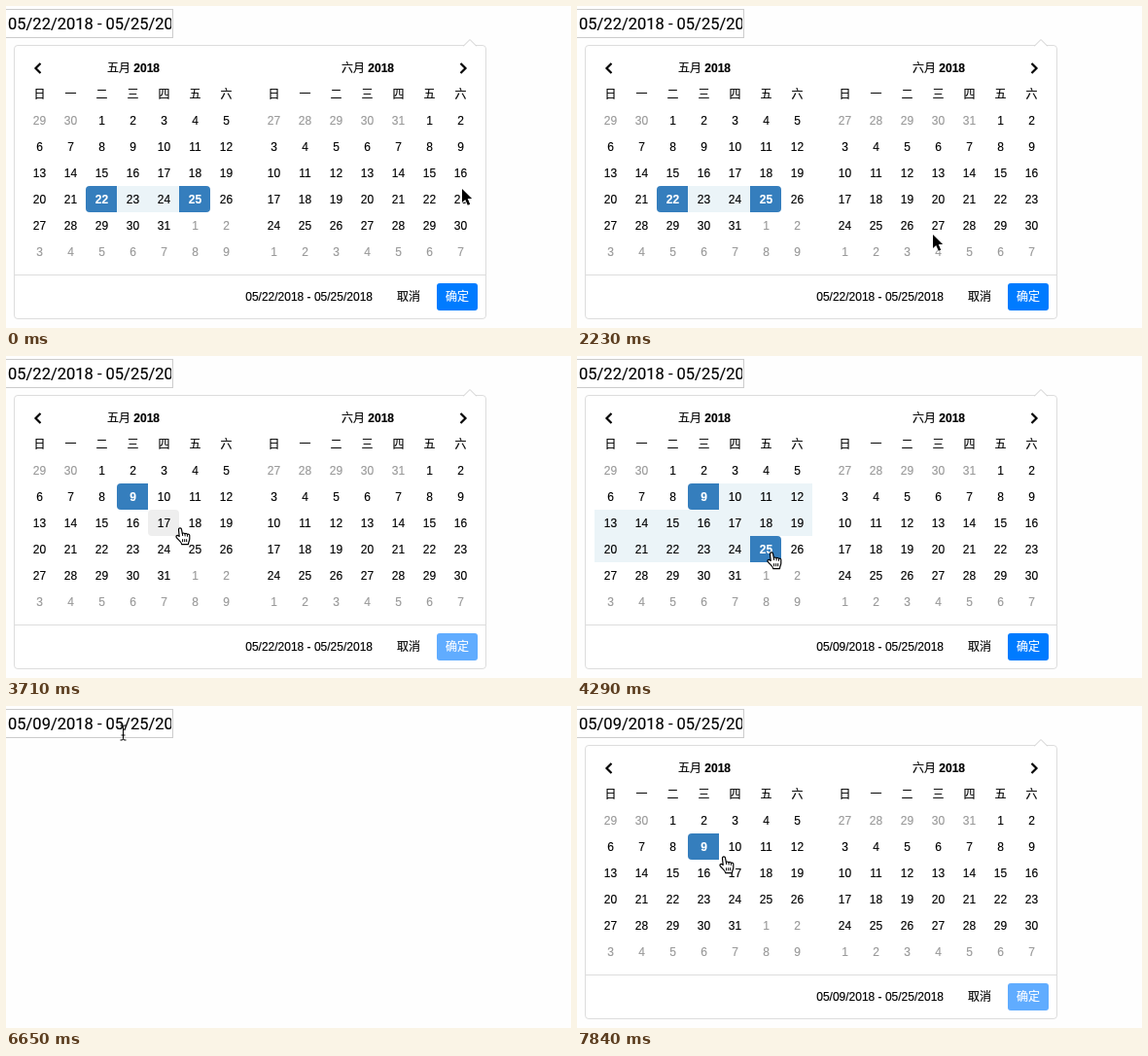
Recreate the animation shown at these times as an HTML page. Size 581 px wide and 331 px high, loop 7990 ms.

```html
<!DOCTYPE html>
<html lang="zh-CN">
<head>
<meta charset="utf-8">
<title>Date range picker</title>
<style>
html, body { margin: 0; width: 100%; height: 100%; overflow: hidden; background: #fefefe; }
body { font: 12px "Liberation Sans", "Noto Sans CJK SC", Arial, sans-serif; color: #000; }
#stage { position: relative; width: 581px; height: 331px; overflow: hidden; -webkit-text-stroke: .15px; }
#stage * { box-sizing: border-box; }
#stage div, #stage svg { position: absolute; }
#field {
  left: -1px; top: 3px; width: 173px; height: 30px;
  border: 1px solid #ccc; background: #fff;
}
#field.focus { box-shadow: 0 0 0 1px #6fb0f6, 0 0 0 3px #a9cff9; }
#value {
  left: 2px; top: 0; width: 168px; overflow: hidden;
  font: 16.5px/29px Roboto, sans-serif; white-space: pre;
}
#picker {
  left: 8px; top: 40px; width: 486px; height: 282px;
  border: 1px solid #ddd; border-radius: 4px; background: #fff;
}
#tip { left: 461px; top: -8px; }
.cell { width: 32px; height: 27px; padding-left: 1px; line-height: 28px; text-align: center; }
.medium { font-weight: 500; }
.title { width: 120px; line-height: 28px; text-align: center; }
.off { color: #999; }
.hover { background: #eee; border-radius: 4px; }
.range { background: #ebf4f8; }
.start, .end { background: #357ebd; color: #fff; font-weight: bold; }
.start { border-radius: 4px 0 0 4px; }
.end { border-radius: 0 4px 4px 0; }
#foot { left: 0; right: 0; top: 235px; height: 45px; border-top: 1px solid #ddd; line-height: 44px; }
#label { right: 116px; top: 0; white-space: pre; }
#cancel { left: 393px; top: 0; }
#apply {
  left: 434px; top: 8px; width: 42px; height: 28px; line-height: 28px;
  border-radius: 3px; background: #007bff; color: #fff; text-align: center;
}
#apply.disabled { background: #60acff; }
#apply.over { background: #0065d3; }
.cursor { left: 0; top: 0; overflow: visible; }
</style>
</head>
<body>
<div id="stage">
  <div id="field"><div id="value"></div></div>
  <div id="picker">
    <svg id="tip" width="14" height="9"><path d="M0 8.5 7 1.5l7 7" fill="#fff" stroke="#ccc"/></svg>
    <svg width="484" height="40" fill="none" stroke="#000" stroke-width="2.2">
      <path d="M26.5 18l-5 5 5 5M458.5 18l5 5-5 5"/>
    </svg>
    <div id="foot">
      <div id="label"></div>
      <div id="cancel" class="medium">取消</div>
      <div id="apply" class="medium">确定</div>
    </div>
  </div>
  <svg class="cursor" id="arrow" width="14" height="20">
    <path d="M0 0v14l3.2-3 2.6 5.8 2.4-1.1-2.5-5.6h4.4z" fill="#000" stroke="#fff" stroke-width="1.8" paint-order="stroke"/>
  </svg>
  <svg class="cursor" id="hand" width="16" height="19">
    <path d="M4.2 9.4 3.5 2.6a1.5 1.5 0 0 1 3-.4L7.4 6.8a1.4 1.4 0 0 1 2.6.2 1.4 1.4 0 0 1 2.5.6 1.3 1.3 0 0 1 2.3.9V12c0 2.2-1.3 3-1.3 5.6H6.8C6.5 15 3 13 1.2 10.4.4 8.9 1.8 8 2.9 8.6z" fill="#fff" stroke="#000" stroke-width="1.2" stroke-linejoin="round"/>
    <path d="M7.4 6.8 7.7 9M10 7.2l.2 2.2M12.4 7.8l.1 2M7.6 12.2v3M9.7 12.2v3M11.7 12.2v3" stroke="#000" fill="none"/>
  </svg>
  <svg class="cursor" id="beam" width="1" height="1">
    <path d="M-3.5-7.5H-2Q-.5-7.5-.5-6 -.5-7.5 1-7.5H2.5M-.5-6V6M-3.5 7.5H-2Q-.5 7.5-.5 6 -.5 7.5 1 7.5H2.5M-2.5 2.5h4" fill="none" stroke="#000"/>
  </svg>
</div>
<script>
const LOOP = 7990;
const $ = id => document.getElementById(id);
const picker = $('picker');
const days = [];

function add(html, cls, x, y) {
  const el = document.createElement('div');
  el.className = cls;
  el.innerHTML = html;
  el.style.left = x + 'px';
  el.style.top = y + 'px';
  picker.append(el);
  return el;
}

function addMonth(x, name, month, firstMonth, firstDay) {
  add(name + ' <b>2018</b>', 'title medium', x + 53, 9);
  [...'日一二三四五六'].forEach((d, i) => add(d, 'cell medium', x + 32 * i, 36));
  for (let i = 0; i < 42; i++) {
    const date = new Date(2018, firstMonth, firstDay + i);
    const inside = date.getMonth() === month;
    const el = add(date.getDate(), inside ? 'cell' : 'cell off', x + 32 * (i % 7), 63 + 27 * Math.floor(i / 7));
    if (inside && month === 4) days[date.getDate()] = el;
  }
}
addMonth(9, '五月', 4, 3, 29);
addMonth(250, '六月', 5, 4, 27);

// Cursor samples: time, shape, x, y
const moves = [
  [0, 'arrow', 469, 188], [150, 'arrow', 482, 185], [300, 'arrow', 515, 180],
  [440, 'arrow', 556, 177], [590, ''],
  [2230, 'arrow', 366, 235], [2380, 'arrow', 300, 212], [2530, 'arrow', 212, 180],
  [2680, 'arrow', 142, 156], [2830, 'arrow', 121, 149],
  [3120, 'hand', 117, 148], [3560, 'hand', 138, 159], [3710, 'hand', 174, 176],
  [3860, 'hand', 188, 190], [4000, 'hand', 194, 199], [4290, 'hand', 195, 201],
  [5040, 'hand', 202, 206], [5190, 'arrow', 246, 225], [5330, 'arrow', 316, 256],
  [5480, 'arrow', 395, 281], [5630, 'hand', 452, 295], [5770, 'hand', 467, 298],
  [5920, 'arrow', 471, 299], [6220, 'arrow', 440, 270], [6360, 'arrow', 310, 155],
  [6510, 'arrow', 165, 55], [6650, 'beam', 121, 27.5],
  [7100, 'beam', 122, 30], [7250, 'arrow', 125, 52], [7400, 'arrow', 129, 92],
  [7540, 'hand', 126, 136], [7690, 'hand', 128, 143], [7840, 'hand', 146, 154]
];

// Each entry changes only the listed parts of the picker
const changes = [
  [0, { open: true, focus: false, value: 22, label: 22, start: 22, end: 25, hover: 0, over: false }],
  [3120, { hover: 9 }],
  [3270, { start: 9, end: 0, hover: 0 }],
  [3710, { hover: 17 }],
  [3860, { hover: 18 }],
  [4000, { hover: 25 }],
  [4150, { end: 25, label: 9, hover: 0 }],
  [5630, { over: true }],
  [5920, { open: false, value: 9, over: false }],
  [6800, { open: true, focus: true }],
  [7690, { focus: false, end: 0 }]
];

const span = day => `05/${String(day).padStart(2, '0')}/2018 - 05/25/2018`;

function dayClass(day, s) {
  if (day === s.start) return ' start';
  if (day === s.end) return ' end';
  if (day === s.hover) return ' hover';
  return day > s.start && day < s.end ? ' range' : '';
}

function drawPicker(t) {
  const s = Object.assign({}, ...changes.filter(c => c[0] <= t).map(c => c[1]));
  picker.style.display = s.open ? '' : 'none';
  $('field').className = s.focus ? 'focus' : '';
  $('value').textContent = span(s.value);
  $('label').textContent = span(s.label);
  $('apply').className = 'medium' + (s.end ? '' : ' disabled') + (s.over ? ' over' : '');
  days.forEach((el, day) => { el.className = 'cell' + dayClass(day, s); });
}

function drawCursor(t) {
  const [, shape, x, y] = moves.filter(m => m[0] <= t).pop();
  for (const id of ['arrow', 'hand', 'beam']) {
    const el = $(id);
    el.style.display = id === shape ? '' : 'none';
    if (id === shape) el.style.transform = `translate(${x}px, ${y}px)`;
  }
}

const stops = [...moves, ...changes].map(e => e[0]);
let shown = -1;
function draw() {
  const t = performance.now() % LOOP;
  const stop = Math.max(...stops.filter(v => v <= t));
  if (stop !== shown) {
    shown = stop;
    drawPicker(t);
    drawCursor(t);
  }
  requestAnimationFrame(draw);
}
draw();
</script>
</body>
</html>
```
